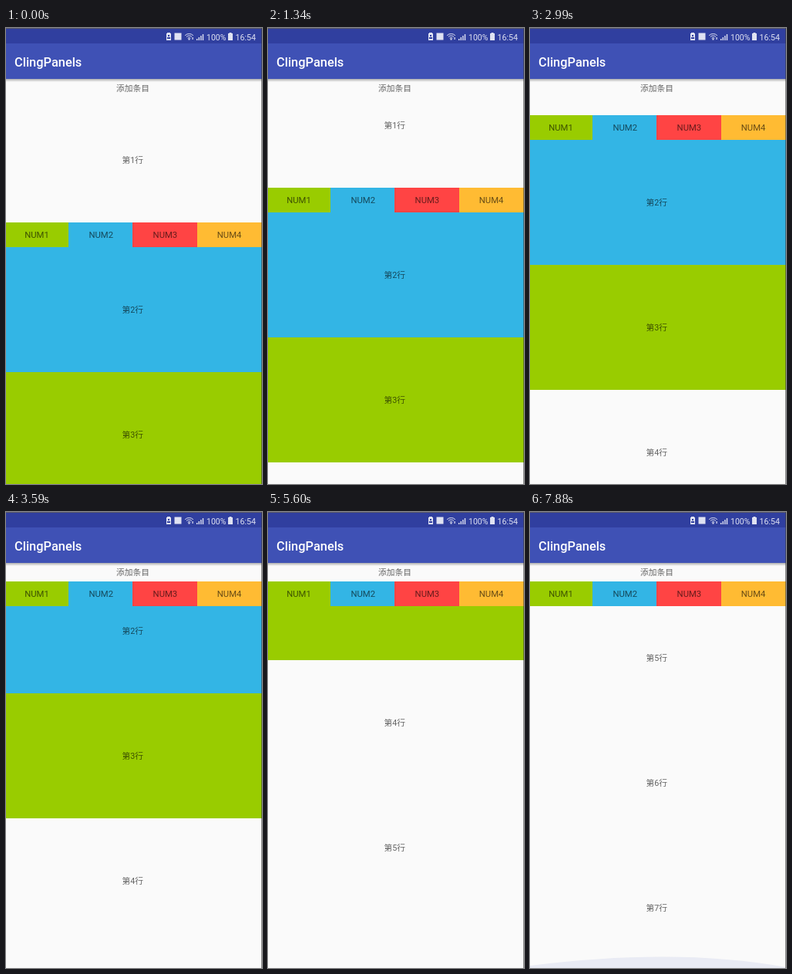
Recreate the animation shown at these times as an HTML page with a canvas. Size 332 by 591 pixels, loop 8000 ms.

```html
<!DOCTYPE html>
<html lang="zh">
<head>
<meta charset="utf-8">
<title>ClingPanels</title>
<style>
  html, body { margin: 0; width: 100%; height: 100%; overflow: hidden; background: #fafafa; }
  canvas { display: block; width: 332px; height: 591px; }
</style>
</head>
<body>
<canvas id="stage"></canvas>
<script>
const W = 332, H = 591, LOOP = 8000;
const PIN = 90, TAB_TOP = 252, TAB_H = 32, ROW_H = 162;
const GREEN = '#99cc00', BLUE = '#33b5e5', RED = '#ff4444', ORANGE = '#ffbb33', PAPER = '#fafafa';
const LIGHT = '#dfe2f2', NAVY = '#303f9f';
const FONT = 'Roboto, "Noto Sans CJK SC", "Noto Sans CJK", sans-serif';
const INK = 'rgba(0,0,0,.6)';

// power 1 is a steady drag, higher powers slow down like a fling
const swipes = [
  { start: 830, end: 1560, to: 64, power: 1 },
  { start: 2060, end: 2630, to: 136, power: 2 },
  { start: 2965, end: 3800, to: 236, power: 1 },
  { start: 4000, end: 4900, to: 320, power: 2 },
  { start: 4960, end: 5600, to: 416, power: 1 },
  { start: 5930, end: 6470, to: 664, power: 3 },
  { start: 6800, end: 7150, to: 600, power: 1 },
  { start: 7150, end: 7880, to: 662, power: 3 }
];

const stage = document.getElementById('stage');
const c = stage.getContext('2d');
const dpr = window.devicePixelRatio || 1;
stage.width = W * dpr;
stage.height = H * dpr;
c.scale(dpr, dpr);

const progress = (t, start, end) => Math.min(1, Math.max(0, (t - start) / (end - start)));

function scrollAt(t) {
  let s = 0;
  for (const { start, end, to, power } of swipes) {
    s += (to - s) * (1 - (1 - progress(t, start, end)) ** power);
  }
  return Math.round(s);
}

function rect(x, y, w, h, color) {
  c.fillStyle = color;
  c.fillRect(x, y, w, h);
}

function text(str, x, y, size, color = INK, align = 'center', weight = 400) {
  c.font = `${weight} ${size}px ${FONT}`;
  c.textAlign = align;
  c.fillStyle = color;
  c.fillText(str, x, y);
}

function drawRows(s) {
  for (let n = 1; n <= 7; n++) {
    const top = (n === 1 ? PIN : TAB_TOP + TAB_H + (n - 2) * ROW_H) - s;
    if (top > H || top + ROW_H < PIN) continue;
    rect(0, top, W, ROW_H, n === 2 ? BLUE : n === 3 ? GREEN : PAPER);
    text(`第${n}行`, 164.3, top + 85, 10.75);
  }
}

function drawTabs(s) {
  const y = Math.max(PIN, TAB_TOP - s);
  [GREEN, BLUE, RED, ORANGE].forEach((color, i) => {
    rect(Math.round(i * 83.5 - 2.6), y, 88, TAB_H, color);
    text('NUM' + (i + 1), 40 + i * 83.2, y + 20, 11.3);
  });
}

function drawGlow(t) {
  const g = progress(t, 7700, 7880);
  if (!g) return;
  c.fillStyle = `rgba(63,81,181,${0.09 * g})`;
  c.beginPath();
  c.moveTo(0, H);
  c.lineTo(0, H - 3 * g);
  c.quadraticCurveTo(190, H - 27 * g, W, H - g);
  c.lineTo(W, H);
  c.fill();
}

function drawWifi(x, y) {
  c.strokeStyle = LIGHT;
  c.lineWidth = 1;
  for (let r = 2.5; r < 8; r += 2.5) {
    c.beginPath();
    c.arc(x, y, r, -Math.PI * 0.75, -Math.PI * 0.25);
    c.stroke();
  }
  rect(x - 1, y - 1.5, 2, 2, LIGHT);
  rect(x + 4, y - 3, 1.2, 3, LIGHT);
}

function drawStatus() {
  rect(0, 0, W, 20, NAVY);
  rect(0, 0, W, 1, '#5a5a68');
  // battery saver and tag
  rect(209, 6, 4, 1, LIGHT);
  rect(208, 7, 6, 9, LIGHT);
  rect(210, 9, 2, 2, NAVY);
  rect(209, 12, 4, 2, NAVY);
  rect(218.5, 6.5, 9, 9, LIGHT);
  drawWifi(237.5, 15);
  for (let i = 0; i < 4; i++) rect(247 + i * 2.6, 14 - i * 2, 1.4, 2 + i * 2, LIGHT);
  text('100%', 260, 15.5, 10.5, LIGHT, 'left');
  rect(289.5, 6, 3, 1, LIGHT);
  rect(288, 7, 6, 9, LIGHT);
  text('16:54', 324, 15.5, 10.7, LIGHT, 'right');
}

function drawBars() {
  rect(0, 66, W, PIN - 66, PAPER);
  text('添加条目', 164.5, 82, 10.75);
  const shade = c.createLinearGradient(0, 66, 0, 70);
  shade.addColorStop(0, 'rgba(0,0,0,.3)');
  shade.addColorStop(1, 'rgba(0,0,0,0)');
  rect(0, 66, W, 4, shade);
  rect(0, 20, W, 46, '#3f51b5');
  text('ClingPanels', 11, 49.5, 16.4, '#fff', 'left', 500);
  drawStatus();
}

function draw(t) {
  const s = scrollAt(t);
  rect(0, 0, W, H, PAPER);
  drawRows(s);
  drawTabs(s);
  drawGlow(t);
  drawBars();
  rect(W - 1, 0, 1, H, 'rgba(60,60,60,.6)');
}

const start = performance.now();
function tick() {
  draw((performance.now() - start) % LOOP);
  requestAnimationFrame(tick);
}
tick();
</script>
</body>
</html>
```
